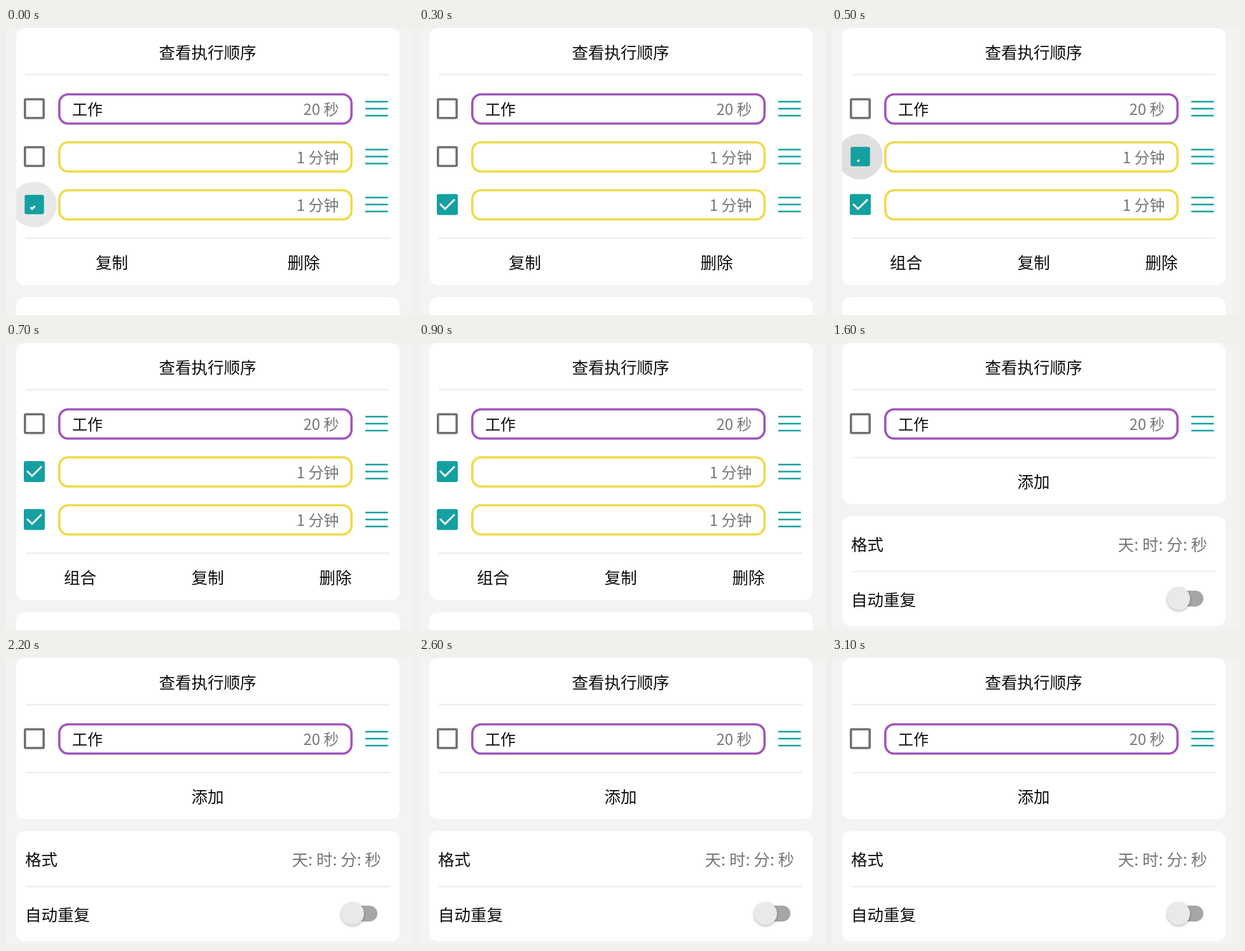
Recreate the animation shown at these times as an HTML page with a canvas. Size 640 px wide and 452 px high, loop 3200 ms.

```html
<!DOCTYPE html>
<html lang="zh-CN">
<head>
<meta charset="utf-8">
<style>
html, body { margin: 0; width: 100%; height: 100%; overflow: hidden; background: #f3f3f3; }
canvas { display: block; }
</style>
</head>
<body>
<canvas id="stage" width="640" height="452"></canvas>
<script>
const g = document.getElementById('stage').getContext('2d');
const LOOP = 3200, STEP = 100;
const TEAL = '#14a0a0', PURPLE = '#a154bd', YELLOW = '#efda48';
const INK = '#0c0c0c', GREY = '#777';

function text(s, x, middle, size = 25.5, color = INK, align = 'center') {
  g.font = `${size}px "Noto Sans CJK SC", "Noto Sans CJK", sans-serif`;
  g.textAlign = align;
  g.fillStyle = color;
  g.fillText(s, x, middle + size * 0.38);
}

function box(x, y, w, h, r) {
  g.beginPath();
  g.roundRect(x, y, w, h, r);
}

function fillBox(x, y, w, h, r, color) {
  box(x, y, w, h, r);
  g.fillStyle = color;
  g.fill();
}

function stroke(color, width) {
  g.strokeStyle = color;
  g.lineWidth = width;
  g.stroke();
}

function disc(x, y, r, color) {
  g.beginPath();
  g.arc(x, y, r, 0, 7);
  g.fillStyle = color;
  g.fill();
}

function line(x1, x2, y, color, width) {
  g.beginPath();
  g.moveTo(x1, y);
  g.lineTo(x2, y);
  stroke(color, width);
}

const card = (top, bottom) => fillBox(16, top, 603, bottom - top, 14, '#fff');
const rule = y => line(31, 603, y, '#ebebeb', 2);

// tick: 0 is an empty box, 1 a fully drawn check mark
function checkbox(y, tick) {
  if (!tick) {
    box(29.8, y - 14.7, 29.4, 29.4, 1.5);
    stroke('#717171', 3.6);
    return;
  }
  const half = tick < 1 ? 15.2 : 16.5;
  fillBox(44.5 - half, y - half, half * 2, half * 2, 3, TEAL);
  g.beginPath();
  g.moveTo(41 - 8 * tick, y + 7 - 8 * tick);
  g.lineTo(41, y + 7);
  g.lineTo(41 + 15 * tick, y + 7 - 15 * tick);
  stroke('#fff', 3);
}

function ripple(y, alpha) {
  if (!alpha) return;
  g.save();
  g.beginPath();
  g.rect(16, 0, 603, 452);
  g.clip();
  disc(44, y, 36, `rgba(0,0,0,${alpha})`);
  g.restore();
}

function row(y, color, name, time, tick = 0, shade = 0) {
  ripple(y, shade);
  checkbox(y, tick);
  box(83.8, y - 22.5, 459.5, 46, 14);
  stroke(color, 3.6);
  text(name, 104, y + 1, 24, INK, 'left');
  text(time, 523.5, y + 1, 24, GREY, 'right');
  for (const dy of [-11, 0, 11]) line(565, 600.5, y + dy, TEAL, 2.6);
}

function touch(x, y) {
  disc(x, y, 19.5, 'rgba(255,255,255,.5)');
  stroke('#d4d2e2', 2.8);
}

function selecting(t) {
  const second = t >= 500;
  card(0, 405);
  row(127, PURPLE, '工作', '20 秒');
  row(202.5, YELLOW, '', '1 分钟',
    second ? Math.min(1, 0.12 + (t - 500) / 200) : 0,
    t === 400 ? 0.07 : t === 500 ? 0.125 : 0);
  row(278, YELLOW, '', '1 分钟',
    Math.min(1, 0.3 + t / 200),
    Math.max(0, 0.09 - t / 2000));
  rule(331);
  if (second) {
    ['组合', '复制', '删除'].forEach((s, i) => text(s, 116.5 + i * 200.7, 369));
  } else {
    text('复制', 166.5, 369);
    text('删除', 468, 369);
  }
  card(424, 480);
  if (t === 400) touch(44, 208);
  if (t >= 1400) touch(507, 381);
}

function deleted() {
  card(0, 254);
  row(127, PURPLE, '工作', '20 秒');
  rule(180.5);
  text('添加', 317, 218);
  card(272.5, 446);
  text('格式', 30, 317.5, 25.5, INK, 'left');
  text('天: 时: 分: 秒', 590, 317.5, 25.5, GREY, 'right');
  rule(360);
  text('自动重复', 30, 404, 25.5, INK, 'left');
  fillBox(535, 390, 49, 25, 12.5, '#a6a6a6');
  g.save();
  g.shadowColor = 'rgba(0,0,0,.3)';
  g.shadowBlur = 4;
  g.shadowOffsetY = 1.5;
  disc(545, 402.5, 18, '#e9e9e9');
  g.restore();
}

function draw() {
  const t = Math.floor(performance.now() % LOOP / STEP) * STEP;
  g.fillStyle = '#f3f3f3';
  g.fillRect(0, 0, 640, 452);
  if (t < 1600) selecting(t);
  else deleted();
  // the title and its rule stay in every state
  text('查看执行顺序', 317, 38);
  rule(73.5);
  requestAnimationFrame(draw);
}
draw();
</script>
</body>
</html>
```
